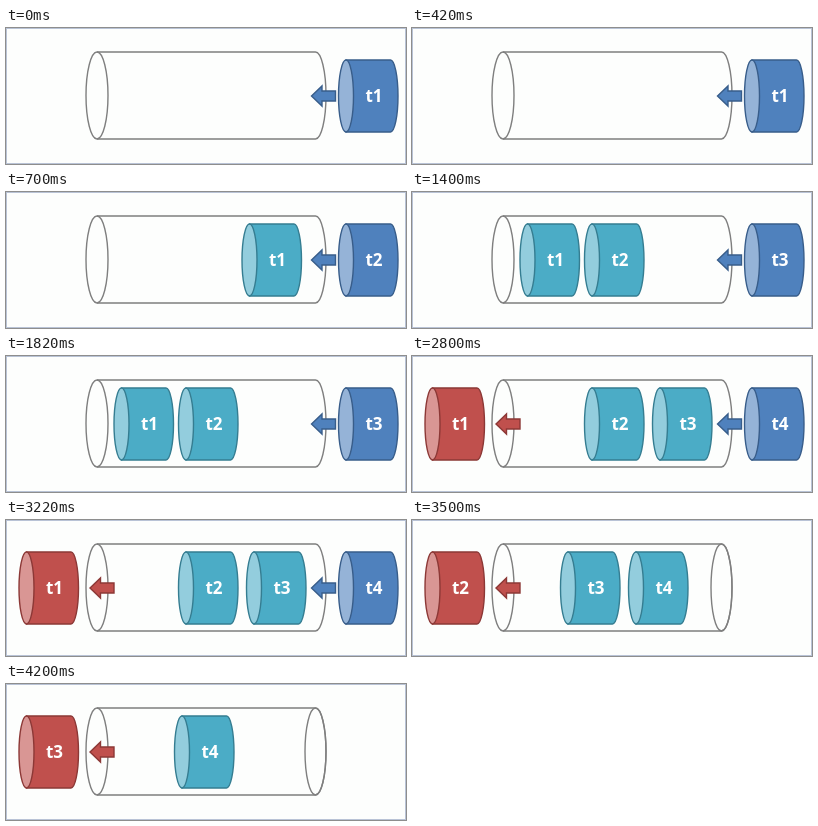
These frames come from a looping animation (400x136 px, 4.9 s). An HTML page:

```html
<!DOCTYPE html>
<html lang="en">
<head>
<meta charset="utf-8">
<title>Queue</title>
<style>
  html, body { margin: 0; width: 100%; height: 100%; overflow: hidden; }
  svg { display: block; width: 100%; height: 100%; }
  text { font: bold 17px "Open Sans", "Noto Sans", sans-serif; text-anchor: middle; fill: #fff; }
</style>
</head>
<body>
<svg id="stage" viewBox="0 0 400 136"></svg>
<script>
const STEP = 700;
const MID = 68;
const BLUE = { fill: '#4f81bd', face: '#95b3d7', line: '#385d8a' };
const TEAL = { fill: '#4bacc6', face: '#93cddd', line: '#357d91' };
const RED = { fill: '#c0504d', face: '#d99694', line: '#8c3836' };

// Each step: task entering, tasks inside as [number, x], task leaving.
const steps = [
  { enter: 1, inside: [] },
  { enter: 2, inside: [[1, 236]] },
  { enter: 3, inside: [[1, 108], [2, 172.5]] },
  { inside: [[1, 108], [2, 172.5], [3, 236.5]] },
  { enter: 4, inside: [[2, 172.5], [3, 240.5]], leave: 1 },
  { inside: [[3, 148.5], [4, 216.5]], leave: 2 },
  { inside: [[4, 168.5]], leave: 3 }
];

function can(n, x, { fill, face, line }) {
  return `<g stroke="${line}" stroke-width="1.4">
    <path fill="${fill}" d="M${x + 7.5} 32H${x + 52}a7.5 36 0 0 1 0 72H${x + 7.5}z"/>
    <ellipse fill="${face}" cx="${x + 7.5}" cy="${MID}" rx="7.5" ry="36"/>
  </g><text x="${x + 35.5}" y="74">t${n}</text>`;
}

function arrow(x, { fill, line }) {
  return `<path fill="${fill}" stroke="${line}" stroke-width="1.4"
    d="M${x} ${MID}l10.5 -10v5h13.5v10h-13.5v5z"/>`;
}

function tube(open) {
  const end = open ? '' : '<ellipse cx="309.5" cy="67.5" rx="10.5" ry="43.5"/>';
  return `<g fill="none" stroke="#7f7f7f" stroke-width="1.4">
    <path d="M91 24H309.5a10.5 43.5 0 0 1 0 87H91"/>
    <ellipse cx="91" cy="67.5" rx="11" ry="43.5"/>${end}</g>`;
}

function scene({ enter, inside, leave }) {
  let out = '<rect x=".5" y=".5" width="399" height="135" fill="#fdfefd" stroke="#b9c3d6"/>';
  out += tube(enter);
  for (const [n, x] of inside) out += can(n, x, TEAL);
  if (enter) out += arrow(305.5, BLUE) + can(enter, 332.5, BLUE);
  if (leave) out += arrow(84, RED) + can(leave, 13, RED);
  return out;
}

const stage = document.getElementById('stage');
let shown = -1;

function draw() {
  const i = Math.floor(performance.now() / STEP) % steps.length;
  if (i !== shown) stage.innerHTML = scene(steps[shown = i]);
  requestAnimationFrame(draw);
}
draw();
</script>
</body>
</html>
```
